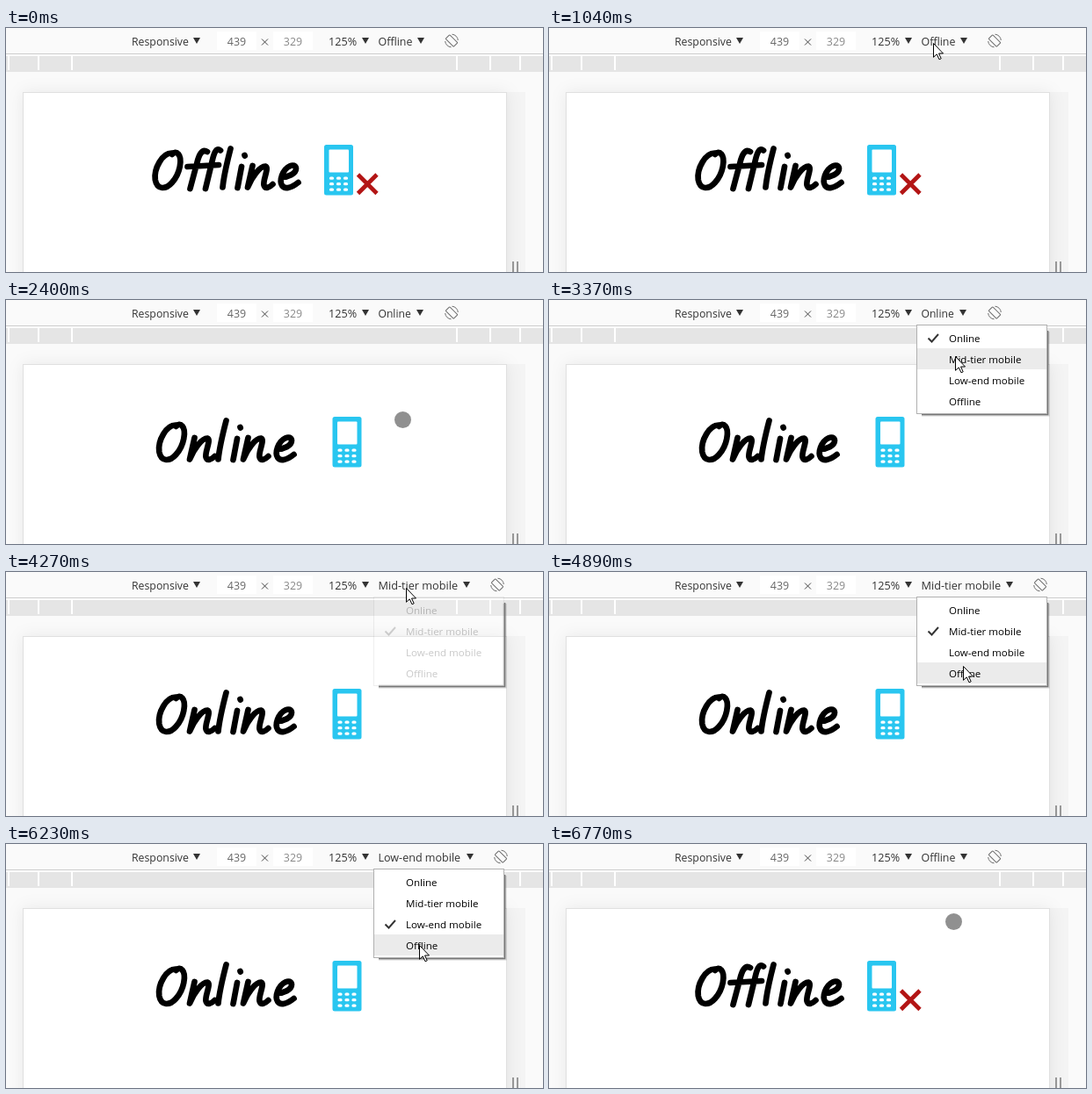
An HTML page that plays this animation: 611x278 px, repeating every 7290 ms.

```html
<!DOCTYPE html>
<html lang="en">
<head>
<meta charset="utf-8">
<title>Network throttling</title>
<style>
html, body { margin: 0; width: 100%; height: 100%; overflow: hidden; background: #fafafa; }
svg { display: block; width: 611px; height: 278px; }
text { font-family: "Open Sans", "Noto Sans", sans-serif; font-size: 12.4px; fill: #333; }
#menu text { font-size: 11.55px; fill: #000; }
.ink { fill: none; stroke: #000; stroke-width: 6.7; stroke-linecap: round; stroke-linejoin: round; }
.page { filter: drop-shadow(0 0 9px rgba(0, 0, 0, .07)); }
</style>
</head>
<body>
<svg viewBox="0 0 611 278">
  <defs>
    <path id="down" d="M.5 0h8l-4 7z" fill="#333"/>
    <path id="O" d="M189 142.500C178 142 168 160 169.800 173C172 185 182 184 189 176C198 166 201 149 196 143.500C194 141 191 141.500 189 144"/>
    <path id="n" d="M280.500 157L275 181.500C280 169 289 157.500 295 157.500C300 159 292 173 293.500 179C295 184 300 181.500 303.500 178"/>
    <g id="line">
      <path d="M255.500 137.500C252 151 248 167 246.500 181.500"/>
      <path d="M268 158L263.500 182M271.500 145l.2 .4"/>
      <use href="#n"/>
      <path d="M313.500 170C321 170 330 166 330 160C329 153 318 157 314 168C310 179 316 183 321 182C326 181 330 178 332.500 176"/>
    </g>
    <g id="phone">
      <rect x="362" y="133" width="33" height="57.500" rx="2.500" fill="#29c6f0"/>
      <rect x="367.500" y="138.500" width="22.500" height="26" rx="1" fill="#fff"/>
      <path d="M369.500 171.200h18M369.500 177.700h18M369.500 184.200h18" stroke="#fff" stroke-width="3.200" stroke-linecap="round" stroke-dasharray="2 6"/>
    </g>
  </defs>

  <rect width="611" height="278" fill="#fafafa"/>
  <path d="M0 29.500h611" stroke="#ccc"/>
  <rect y="30" width="611" height="2" fill="#fff"/>
  <rect y="32" width="611" height="18" fill="#e5e5e5"/>
  <path d="M3 32v16M37 32v16M75 32v16M513 32v16M551 32v16M585 32v16" stroke="#fff" stroke-width="2"/>

  <text x="143" y="20" style="font-size:12.300px">Responsive</text>
  <use href="#down" x="212.500" y="11"/>
  <rect x="240" y="4" width="45" height="21" fill="#fff"/>
  <rect x="304" y="4" width="45" height="21" fill="#fff"/>
  <text x="262.500" y="20" text-anchor="middle" style="fill:#666">439</text>
  <text x="326.500" y="20" text-anchor="middle" style="fill:#888">329</text>
  <path d="M291 12.500l7 7m0 -7l-7 7" stroke="#444"/>
  <text x="367" y="20" style="font-size:12.700px">125%</text>
  <use href="#down" x="404.500" y="11"/>
  <text id="label" x="423.500" y="20"></text>
  <use id="tick" href="#down" y="11"/>
  <g id="rotate" fill="none" stroke="#6e6e6e">
    <rect x="-6.500" y="-3.300" width="13" height="6.600" rx="1" transform="rotate(45)"/>
    <path d="M.5 -7.300A7.300 7.300 0 0 1 7.300 -.5M-.5 7.300A7.300 7.300 0 0 1 -7.300 .5"/>
  </g>

  <rect x="570" y="73" width="21" height="205" fill="#f4f4f4"/>
  <path d="M577 266v12M582 266v12" stroke="#999" stroke-width="2"/>
  <rect class="page" x="19.500" y="73.500" width="550" height="230" fill="#fff" stroke="#e0e0e0"/>

  <g id="offline" role="img" aria-label="Offline">
    <g class="ink">
      <use href="#O"/>
      <path d="M229 141C223 137 219.500 145 217.500 153L209.500 183M244 139.500C239 135.500 236.500 143 234.500 152L227 183M206.500 158L242 156"/>
      <use href="#line"/>
    </g>
    <use href="#phone"/>
    <path d="M400.500 167l21.500 21.500m0 -21.500l-21.500 21.500" stroke="#b31515" stroke-width="4.700"/>
  </g>
  <g id="online" role="img" aria-label="Online">
    <g class="ink">
      <use href="#O" x="4.500"/>
      <use href="#n" x="-66"/>
      <use href="#line" x="-5"/>
    </g>
    <use href="#phone" x="9.500"/>
  </g>

  <g id="popup">
    <path d="M567.500 36V130.500H424" fill="none" stroke="#000" stroke-opacity=".18" stroke-width="4"/>
    <path d="M567.500 35V130.500H424" fill="none" stroke="#777" stroke-width="1.600"/>
    <g id="menu">
      <rect x="418.500" y="28.500" width="148" height="101" fill="#fff" stroke="#b0b0b0"/>
      <rect id="hover" x="419" width="147" height="24" fill="#ebebeb"/>
      <path id="check" d="M431.500 43.500l4 4l7.500 -8.500" fill="none" stroke="#333" stroke-width="1.900"/>
    </g>
  </g>
  <circle id="dot" r="9.500" fill="#3c3c3c" fill-opacity=".57"/>
  <path id="arrow" d="M.5 .5V16.300L4.200 12.800L7 18.800L9.200 17.800L6.500 12H11.500Z" fill="#fff" stroke="#000" stroke-linejoin="round"/>
</svg>
<script>
const $ = id => document.getElementById(id);
const LOOP = 7290, FADE = 150;

// name, x of the drop-down triangle, x of the rotate icon, text size
const modes = [
  ['Online', 466.5, 507, 12.1],
  ['Mid-tier mobile', 519.5, 559, 12.7],
  ['Low-end mobile', 523.5, 563, 12.55],
  ['Offline', 467.5, 507, 12.4]
];
const picks = [[0, 3], [1730, 0], [3630, 1], [5270, 2], [6460, 3]];
const opens = [[1200, 1730], [3000, 3630], [4240, 5270], [5930, 6460]];

const ease = {
  lin: u => u,
  in: u => u * u,
  out: u => u * (2 - u),
  both: u => u * u * (3 - 2 * u)
};
// time, x, y, easing on the way there
const track = [
  [310, 492, 263], [620, 452, 150, 'in'], [830, 432, 55, 'lin'], [950, 435, 13, 'out'],
  [1010, 436, 16, 'lin'], [1040, 437, 17, 'lin'],
  [1200, 437, 17], [1500, 459, 42, 'both'],
  [1730, 459, 42], [2080, 470, 262, 'both'], [2400, 451, 137, 'in'], [2430, 453, 104, 'lin'], [2840, 450, 20, 'out'],
  [3000, 450, 20], [3370, 462, 64, 'both'],
  [3630, 462, 64], [4010, 455, 16, 'both'],
  [4240, 455, 16], [4620, 468, 118, 'both'], [4770, 471, 118, 'lin'], [4890, 471, 107, 'lin'], [4950, 471, 101, 'out'],
  [5080, 471, 101], [5110, 471, 97, 'lin'],
  [5270, 471, 97], [5730, 457, 21, 'both'],
  [5900, 457, 21], [5930, 460, 34, 'lin'], [6230, 470, 115, 'out'],
  [6460, 470, 115], [6770, 460, 88, 'both']
];

modes.forEach(([name], i) => {
  const item = document.createElementNS('http://www.w3.org/2000/svg', 'text');
  item.textContent = name;
  item.setAttribute('x', 455);
  item.setAttribute('y', 48 + 24 * i);
  $('menu').append(item);
});

const show = (id, on) => $(id).setAttribute('visibility', on ? 'visible' : 'hidden');
const move = (id, x, y) => $(id).setAttribute('transform', `translate(${x} ${y})`);

function pointer(t) {
  const i = track.findIndex(k => k[0] > t);
  if (i < 0) return track[track.length - 1].slice(1, 3);
  if (i === 0) return track[0].slice(1, 3);
  const [t0, x0, y0] = track[i - 1], [t1, x1, y1, kind = 'lin'] = track[i];
  const u = ease[kind]((t - t0) / (t1 - t0));
  return [x0 + (x1 - x0) * u, y0 + (y1 - y0) * u];
}

function draw(t) {
  const mode = picks.filter(p => p[0] <= t).pop()[1];
  const [name, tickX, iconX, size] = modes[mode];
  $('label').textContent = name;
  $('label').style.fontSize = size + 'px';
  $('tick').setAttribute('x', tickX);
  move('rotate', iconX, 14.5);
  show('offline', mode === 3);
  show('online', mode !== 3);

  const [x, y] = pointer(t).map(Math.round);
  const open = opens.find(([a, b]) => t >= a && t < b);
  $('popup').style.display = open ? '' : 'none';
  if (open) {
    const row = Math.floor((y - 31) / 24);
    $('menu').setAttribute('opacity', Math.min(1, (t - open[0]) / FADE));
    $('hover').setAttribute('y', 31 + 24 * row);
    $('hover').style.display = row >= 0 && row < 4 ? '' : 'none';
    move('check', 0, 24 * mode);
  }

  const touch = !open && y > 73;
  show('dot', t >= 310 && touch);
  show('arrow', t >= 310 && !touch);
  move('dot', x + 0.5, y + 0.5);
  move('arrow', x, y);
}

const start = performance.now();
function frame() {
  draw((performance.now() - start) % LOOP);
  requestAnimationFrame(frame);
}
frame();
</script>
</body>
</html>
```
